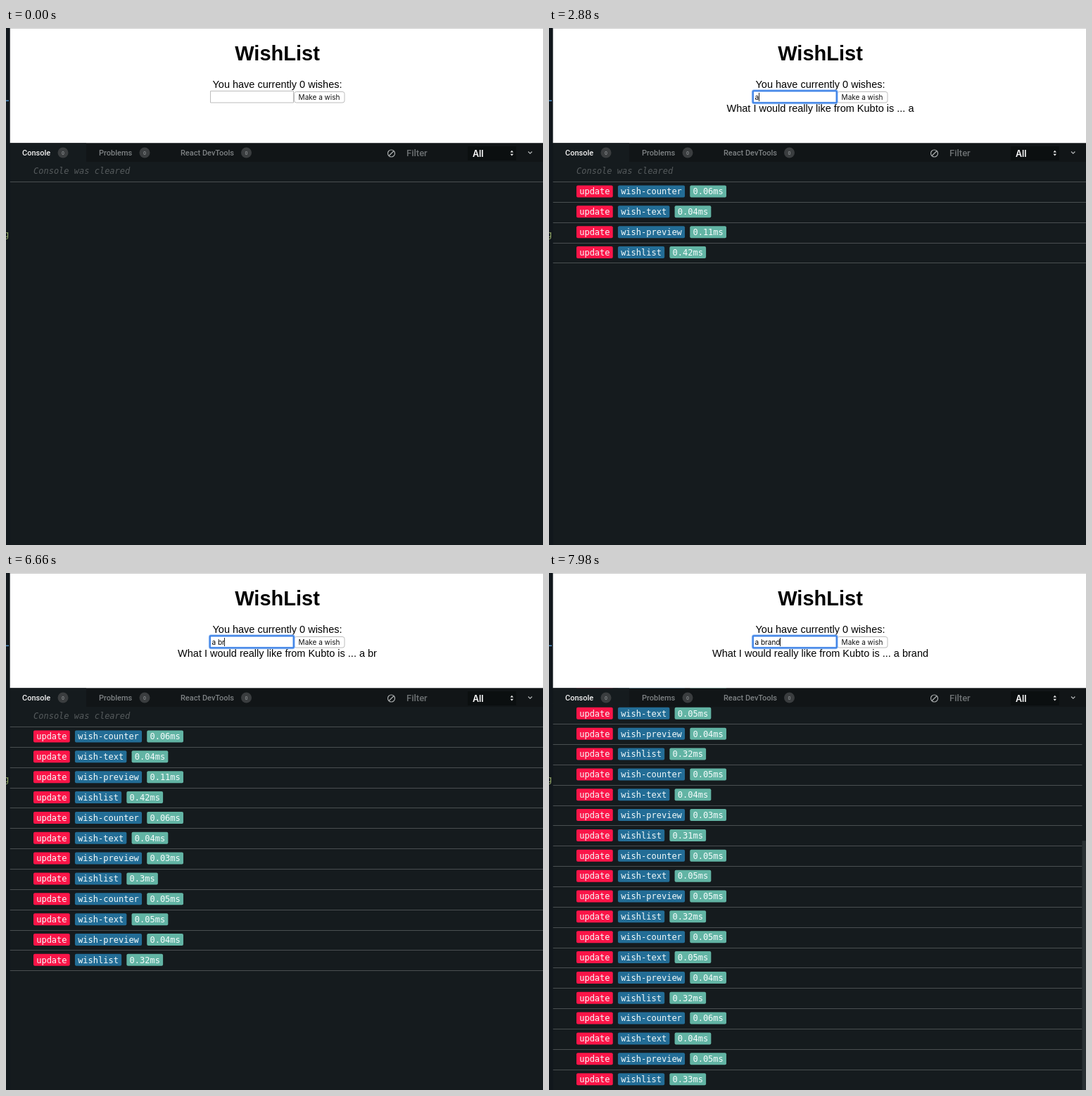
These frames come from a looping animation (763 by 734 pixels, 8 s). An HTML page with a canvas:

```html
<!DOCTYPE html>
<html lang="en">
<head>
<meta charset="utf-8">
<title>WishList</title>
<style>
  html, body { margin: 0; height: 100%; overflow: hidden; background: #151b1e; }
  canvas { display: block; }
</style>
</head>
<body>
<canvas id="stage" width="763" height="734"></canvas>
<script>
const ctx = document.getElementById('stage').getContext('2d');
const LOOP = 8000, W = 763, H = 734;
const SANS = '"Liberation Sans", Arial, sans-serif';
const UI = 'Inter, sans-serif';
const TAB = 'Roboto, sans-serif';
const MONO = '"DejaVu Sans Mono", monospace';

const FOCUS_AT = 1620, ROW_DELAY = 40;
// time typed, character, start of the caret blink
const KEYS = [
  [2800, 'a', 2640], [3600, ' ', 3600], [5320, 'b', 5320], [6660, 'r', 6660],
  [6940, 'a', 6940], [7200, 'n', 7200], [7440, 'd', 7440]
];
const PARTS = ['wish-counter', 'wish-text', 'wish-preview', 'wishlist'];
const COSTS = [
  6, 4, 11, 42, 6, 4, 3, 30, 5, 5, 4, 32, 5, 4, 3, 31,
  5, 5, 5, 32, 5, 5, 4, 32, 6, 4, 5, 33
];
const CONSOLE_TOP = 190, FIRST_LINE = 218.5, PITCH = 28.85;

function rect(x, y, w, h, fill) {
  ctx.fillStyle = fill;
  ctx.fillRect(x, y, w, h);
}

function rounded(x, y, w, h, r, fill, stroke, lineWidth = 1) {
  ctx.beginPath();
  ctx.roundRect(x, y, w, h, r);
  if (fill) { ctx.fillStyle = fill; ctx.fill(); }
  if (stroke) { ctx.strokeStyle = stroke; ctx.lineWidth = lineWidth; ctx.stroke(); }
}

function text(str, x, y, font, fill, align = 'left') {
  ctx.font = font;
  ctx.fillStyle = fill;
  ctx.textAlign = align;
  ctx.fillText(str, x, y);
}

function path(points, stroke, lineWidth, fill) {
  ctx.beginPath();
  points.forEach(([x, y]) => ctx.lineTo(x, y));
  if (fill) { ctx.closePath(); }
  if (stroke) { ctx.strokeStyle = stroke; ctx.lineWidth = lineWidth; ctx.stroke(); }
  if (fill) { ctx.fillStyle = fill; ctx.fill(); }
}

function drawPage(t) {
  const typed = KEYS.filter(k => t >= k[0]);
  const value = typed.map(k => k[1]).join('');
  const focused = t >= FOCUS_AT;

  rect(5.5, 0, W, 163.5, '#fff');
  rect(5.5, 0, W, 1, '#cfcfcf');
  text('WishList', 385.5, 46, `bold 29px ${SANS}`, '#000', 'center');
  text('You have currently 0 wishes:', 385.5, 85, `14.5px ${SANS}`, '#000', 'center');
  if (value) {
    text(`What I would really like from Kubto is ... ${value.trim()}`,
      385.5, 119, `14.5px ${SANS}`, '#000', 'center');
  }

  rounded(409.5, 90.5, 71.5, 15.5, 3, '#fff', '#bdbdbd');
  text('Make a wish', 445, 102, `10px ${UI}`, '#111', 'center');

  if (focused) {
    rounded(289.5, 89, 119.5, 17.5, 2, '#fff', '#a9c9f7', 3.5);
    rounded(289.8, 89.3, 119, 17, 1, null, '#3d82e6', 2);
  } else {
    rounded(290.5, 89.5, 118, 16.5, 0, '#fff', '#bcbcbc');
  }
  text(value, 292.5, 102, `10px ${UI}`, '#000');

  const blinkStart = typed.length ? typed[typed.length - 1][2] : FOCUS_AT;
  if (focused && (t - blinkStart) % 1200 < 800) {
    const x = Math.floor(292.5 + ctx.measureText(value).width);
    rect(x, 92, 1, 12, '#222');
  }
}

function drawTag(label, x, y, fill) {
  ctx.font = `12px ${MONO}`;
  const width = ctx.measureText(label).width + 8.4;
  rounded(x, y - 8.5, width, 17, 2, fill);
  text(label, x + 4.2, y + 4.3, `12px ${MONO}`, '#f4fbfb');
  return x + width + 7.2;
}

function drawConsole(t) {
  const rows = PARTS.length * KEYS.filter(k => t >= k[0] + ROW_DELAY).length;
  const view = H - CONSOLE_TOP;
  const content = FIRST_LINE - CONSOLE_TOP + rows * PITCH;
  const scroll = Math.max(0, content - view);
  const right = scroll ? 757.5 : W;
  const line = y => rect(5.5, Math.round(y - 0.5), right - 5.5, 1, '#4a4f51');

  rect(5.5, 163.5, W, H, '#151b1e');
  text('Console was cleared', 39, 207 - scroll, `italic 12px ${MONO}`, '#565b5d');
  line(FIRST_LINE - scroll);
  for (let i = 0; i < rows; i++) {
    const y = 232 + i * PITCH - scroll;
    let x = drawTag('update', 39, y, '#fb1548');
    x = drawTag(PARTS[i % 4], x, y, '#236d96');
    drawTag(COSTS[i] / 100 + 'ms', x, y, '#62b4a4');
    line(FIRST_LINE + (i + 1) * PITCH - scroll);
  }
  if (scroll) {
    const thumb = view * view / content;
    rect(right, H - thumb, W - right, thumb, '#293033');
  }
}

function drawTabs() {
  rect(5.5, 163.5, W, 26.5, '#111517');
  rect(5.5, 163.5, 108.5, 26.5, '#151b1e');
  [['Console', 23, 81, '#f2f2f2'], ['Problems', 132, 197, '#7e8284'],
   ['React DevTools', 248, 341.5, '#7e8284']].forEach(([name, x, badge, fill]) => {
    text(name, x, 181, `500 11px ${TAB}`, fill);
    rounded(badge - 7.5, 169.5, 15, 15, 7.5, '#3a3d3f');
    text('0', badge, 179.5, `500 7px ${TAB}`, '#888c8e', 'center');
  });

  ctx.beginPath();
  ctx.arc(547.5, 178, 5, 0, Math.PI * 2);
  ctx.strokeStyle = '#a9acad';
  ctx.lineWidth = 1.2;
  ctx.stroke();
  path([[544, 181.5], [551, 174.5]], '#a9acad', 1.2);

  text('Filter', 569, 182, `500 13px ${TAB}`, '#6d7173');
  rect(656, 168, 69, 20, '#0b0f10');
  text('All', 663, 182.5, `600 12.5px ${UI}`, '#fff');
  path([[716.5, 176.5], [718.7, 173.8], [721, 176.5]], null, 0, '#e8e8e8');
  path([[716.5, 178.7], [718.7, 181.4], [721, 178.7]], null, 0, '#e8e8e8');
  path([[742, 175.5], [744.7, 178.2], [747.4, 175.5]], '#b5b8b9', 1.2);
}

function drawEditorEdge() {
  rect(0, 0, 5.5, H, '#11171c');
  rect(0, 102.5, 4, 1.5, '#4f8fc6');
  ctx.save();
  ctx.beginPath();
  ctx.rect(0, 280, 5, 30);
  ctx.clip();
  text('g', -3, 297, `12px ${MONO}`, '#93a867');
  ctx.restore();
}

function glide(t, start, end, from, to) {
  const p = Math.min(1, Math.max(0, (t - start) / (end - start)));
  const e = p * p * (3 - 2 * p);
  return from.map((v, i) => v + (to[i] - v) * e);
}

function drawPointer(t) {
  if (t < 360 || t >= KEYS[0][0]) return;
  const [x, y] = t < 680
    ? glide(t, 340, 440, [684, 567], [719, 326])
    : glide(t, 660, 1420, [719, 326], [347.5, 95.5]);

  if (x > 290 && x < 409 && y > 88 && y < 107) {
    for (const [color, width] of [['#fff', 3], ['#222', 1.2]]) {
      path([[x - 3, y - 7], [x, y - 5.8], [x, y + 5.8], [x - 3, y + 7]], color, width);
      path([[x + 3, y - 7], [x, y - 5.8], [x, y + 5.8], [x + 3, y + 7]], color, width);
    }
    path([[x - 2, y + 2.5], [x + 2, y + 2.5]], '#222', 1);
    return;
  }
  const arrow = [[0, 0], [0, 14], [3.2, 11], [5.4, 16], [7.6, 15], [5.4, 10.2], [10, 10]];
  path(arrow.map(([dx, dy]) => [x + dx, y + dy]), '#fff', 2, '#000');
}

function frame(now) {
  const t = now % LOOP;
  drawConsole(t);
  drawPage(t);
  drawTabs();
  drawEditorEdge();
  drawPointer(t);
  requestAnimationFrame(frame);
}
requestAnimationFrame(frame);
</script>
</body>
</html>
```
